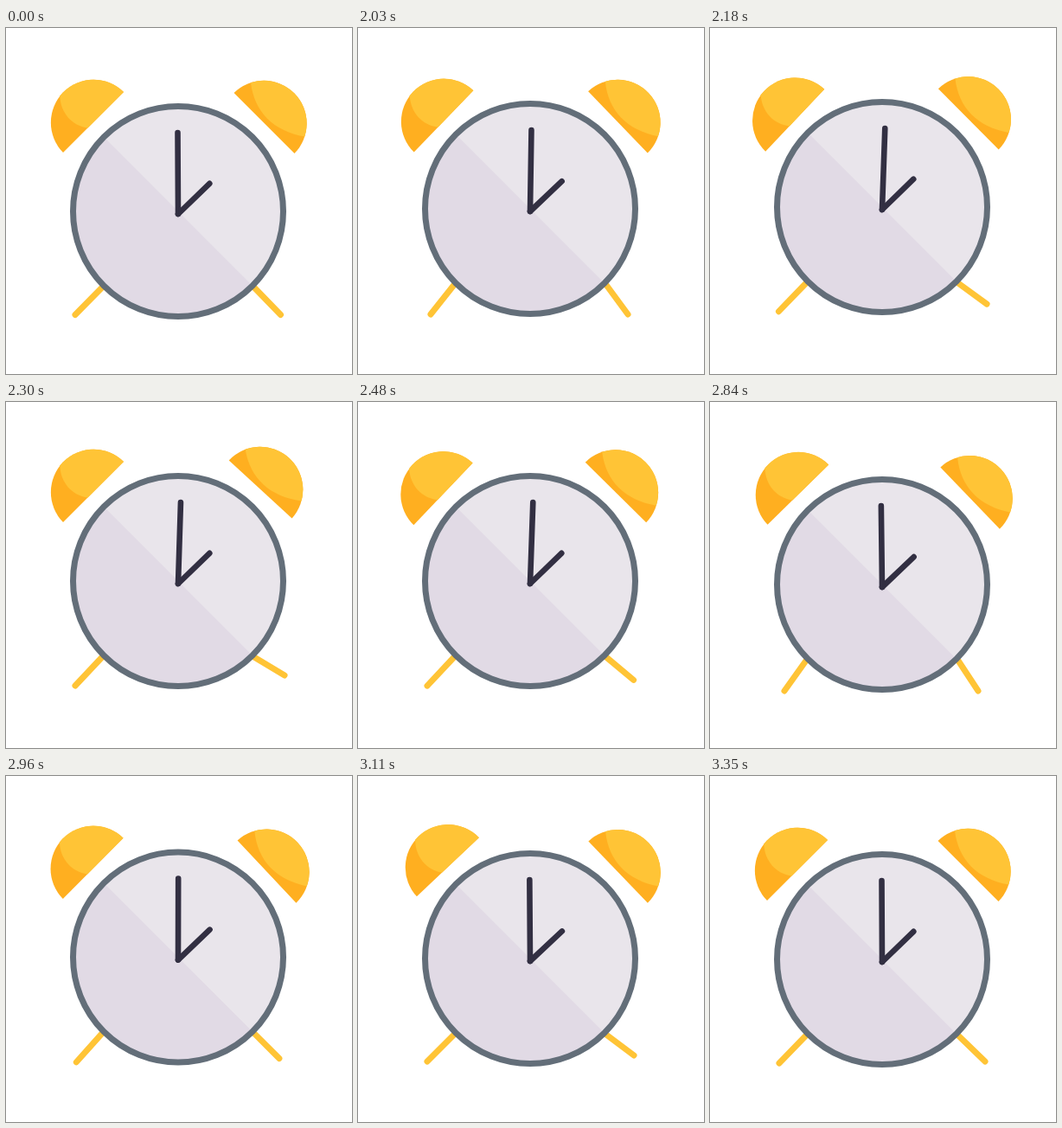
Write an HTML page that moves like this. It is 400 by 400 pixels and loops after 3380 ms.

```html
<!DOCTYPE html>
<html lang="en">
<head>
<meta charset="utf-8">
<title>Alarm clock</title>
<style>
  html, body { margin: 0; width: 100%; height: 100%; overflow: hidden; background: #fff; }
  svg { display: block; width: 100vw; height: 100vh; }
</style>
</head>
<body>
<svg viewBox="0 0 400 400">
  <g stroke="#ffc436" stroke-width="7" stroke-linecap="round">
    <line id="legL"/>
    <line id="legR"/>
  </g>
  <g id="clock">
    <g id="bellL">
      <path fill="#ffaf20" d="M136 74A49.5 49.5 0 0 0 66 144Z"/>
      <path fill="#ffc436" d="M136 74A49.5 49.5 0 0 0 62.3 78.5C63 98 76 113 94.5 115.5Z"/>
    </g>
    <g id="bellR">
      <path fill="#ffaf20" d="M263.5 75A49.5 49.5 0 0 1 333.5 145Z"/>
      <path fill="#ffc436" d="M283 63.2A49.5 49.5 0 0 1 345.3 125.5C309 119 287 97 283 63.2Z"/>
    </g>
    <circle cx="199" cy="212" r="121.5" fill="#e9e5eb"/>
    <path fill="#e1dae5" d="M113.1 126.1A121.5 121.5 0 0 0 284.9 297.9Z"/>
    <circle cx="199" cy="212" r="121.5" fill="none" stroke="#636e79" stroke-width="7"/>
    <g stroke="#322f42" stroke-width="6.6" stroke-linecap="round">
      <line id="hour" x1="199" y1="215" x2="235.3" y2="179.8"/>
      <line id="minute" x1="199" y1="215" x2="199" y2="121"/>
    </g>
  </g>
</svg>
<script>
const LOOP = 3380, RING = 2030, STEP = 30;
const KEYS = [0, 9, 20, 27, 36, 44];
const $ = id => document.getElementById(id);

// rest pose, poses at KEYS, shake size, allowed range
const parts = {
  lift:   { rest: 0,    at: [-3, -5, -3, -1, -1, 0],            amp: 1.6,  min: -5,   max: 0 },
  bellL:  { rest: 0,    at: [-1.1, 0, -.4, .5, 1.6, 0],         amp: 1.3,  min: -2,   max: 1.7 },
  bellR:  { rest: 0,    at: [1.1, -2.4, -.8, 1.2, 1.2, 0],      amp: -1.3, min: -2.4, max: 1.7 },
  hour:   { rest: 0,    at: [.6, 0, .6, .5, 1, 0],              amp: .4,   min: -1,   max: 1.2 },
  minute: { rest: -.3,  at: [.9, 1.8, 1.1, -.7, -.4, -.3],      amp: -.8,  min: -1,   max: 2 },
  legLx:  { rest: 80,   at: [84, 80, 84, 86, 80, 80],           amp: 2.5,  min: 78,   max: 87 },
  legLy:  { rest: 331.5, at: [331, 328, 331, 334, 330, 332],    amp: 1.8,  min: 327,  max: 335 },
  legRx:  { rest: 317.5, at: [312, 322, 312, 310, 319, 318],    amp: -2.5, min: 309,  max: 323 },
  legRy:  { rest: 331.5, at: [331, 316, 331, 334, 323, 330],    amp: 3.5,  min: 315,  max: 335 }
};

function pose(part, n) {
  if (n < 0) return part.rest;
  let i = 0;
  while (i < KEYS.length - 2 && n >= KEYS[i + 1]) i++;
  const u = Math.min(1, (n - KEYS[i]) / (KEYS[i + 1] - KEYS[i]));
  const ease = (1 - Math.cos(Math.PI * u)) / 2;
  const base = part.at[i] + (part.at[i + 1] - part.at[i]) * ease;
  const value = base + part.amp * Math.sin(3 * Math.PI * u);
  return Math.max(part.min, Math.min(part.max, value));
}

function turn(id, angle, x, y) {
  $(id).setAttribute("transform", `rotate(${angle} ${x} ${y})`);
}

function leg(id, x1, y1, x2, y2) {
  const el = $(id);
  Object.entries({ x1, y1, x2, y2 }).forEach(([k, v]) => el.setAttribute(k, v));
}

function draw(ms) {
  const n = Math.floor((ms % LOOP - RING) / STEP);
  const p = {};
  for (const name in parts) p[name] = pose(parts[name], n);
  $("clock").setAttribute("transform", `translate(0 ${p.lift})`);
  turn("bellL", p.bellL, 199, 212);
  turn("bellR", p.bellR, 199, 212);
  turn("hour", p.hour, 199, 215);
  turn("minute", p.minute, 199, 215);
  leg("legL", 111, 300 + p.lift, p.legLx, p.legLy);
  leg("legR", 287, 300 + p.lift, p.legRx, p.legRy);
}

function tick() {
  draw(performance.now());
  requestAnimationFrame(tick);
}
tick();
</script>
</body>
</html>
```
